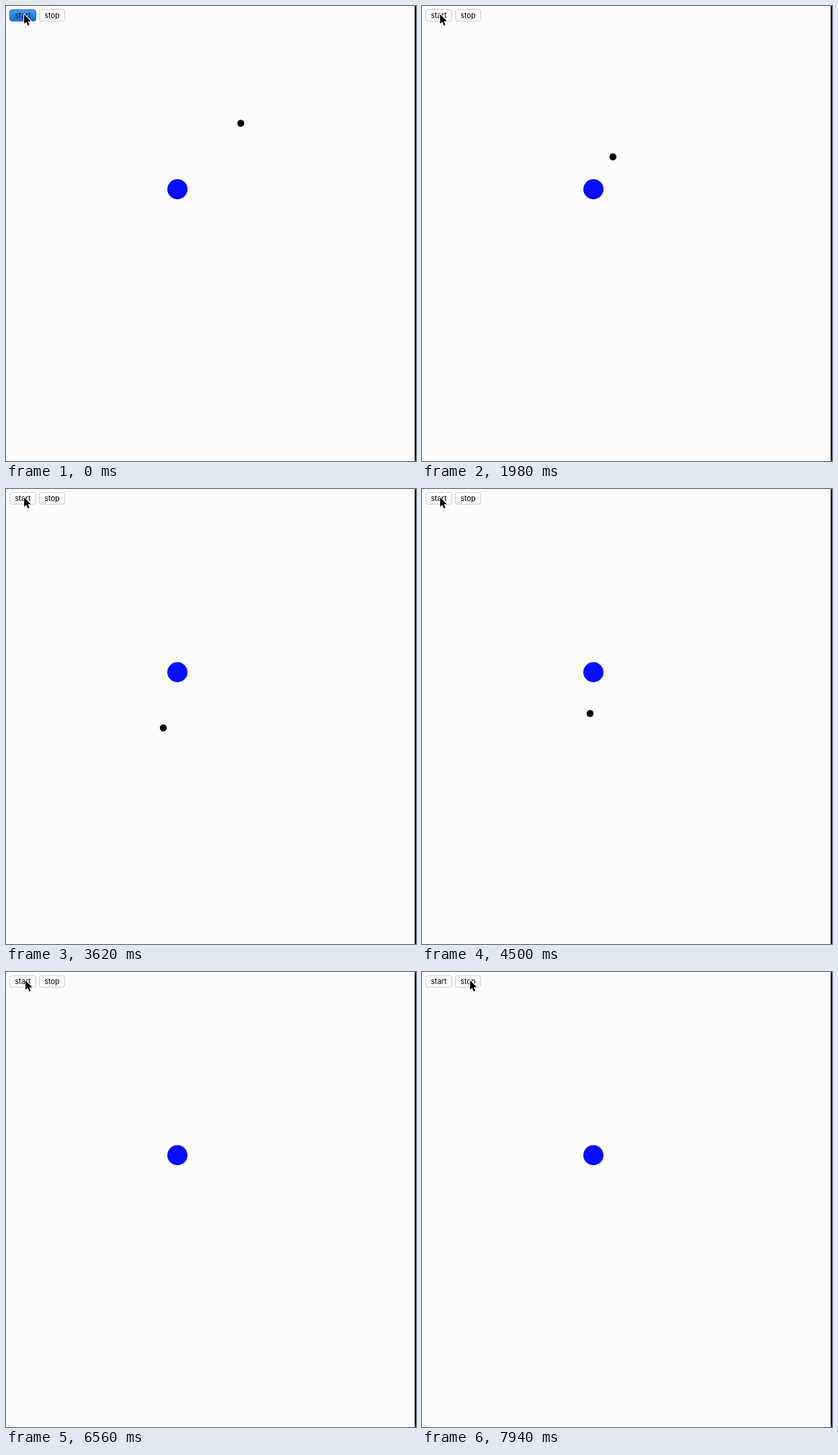
Recreate the animation shown at these times as an HTML page with a canvas. Size 610 by 678 pixels, loop 8000 ms.

```html
<!DOCTYPE html>
<html lang="en">
<head>
<meta charset="utf-8">
<title>Orbit</title>
<style>
  html, body { margin: 0; width: 100%; height: 100%; overflow: hidden; background: #fcfcfe; }
  canvas { display: block; }
</style>
</head>
<body>
<canvas id="stage" width="610" height="678"></canvas>
<script>
const ctx = document.getElementById('stage').getContext('2d');
const LOOP = 8000;
const SUN = { x: 255, y: 273, r: 15 };
const BALL_R = 5.2;
const SKY_TOP = 23;
const GM = 5083;

// Each pass of the ball is a Kepler arc: last step, step and radius of the
// farthest point, its angle in degrees, and the angular momentum.
const ARCS = [
  { end: 20.8, apex: -6.2, R: 142.7, deg: -44.5, L: 80 },
  { end: 40, apex: 30.5, R: 69.5, deg: 123.9, L: 78 },
  { end: 69.3, apex: 54.5, R: 93, deg: -68.5, L: 100 },
  { end: 102.5, apex: 86, R: 102, deg: 100.8, L: 68 },
  { end: Infinity, apex: 239.6, R: 425, deg: -97.5, L: 90 }
];

const CLICKS = [
  { x: 27, y: 13, from: -60, to: 140 },
  { x: 71.5, y: 13, from: 7340, to: 7520 }
];

const clamp = (v, lo, hi) => Math.min(hi, Math.max(lo, v));
const ease = u => u * u * (3 - 2 * u);

// Steps come in threes, shown for 20, 20 and 100 ms.
function stepAt(t) {
  const s = t + 20;
  return 3 * Math.floor(s / 140) + Math.min(2, Math.floor((s % 140) / 20));
}

function ballAt(step) {
  const { apex, R, deg, L } = ARCS.find(arc => step < arc.end);
  const e = 1 - L * L / GM / R;
  const a = R / (1 + e);
  const b = a * Math.sqrt(1 - e * e);
  const mean = clamp((step - apex) * Math.sqrt(GM / a ** 3), -Math.PI, Math.PI);
  let lo = -Math.PI, hi = Math.PI;
  for (let i = 0; i < 40; i++) {
    const mid = (lo + hi) / 2;
    if (mid + e * Math.sin(mid) < mean) lo = mid; else hi = mid;
  }
  const along = a * (e + Math.cos(lo));
  const across = b * Math.sin(lo);
  const q = deg * Math.PI / 180;
  return {
    x: SUN.x + along * Math.cos(q) + across * Math.sin(q),
    y: SUN.y + along * Math.sin(q) - across * Math.cos(q)
  };
}

function pointerAt(t) {
  const nudge = 2 * clamp((t - 6400) / 120, 0, 1);
  const slide = 42.5 * ease(clamp((t - 6640) / 620, 0, 1));
  return { x: 27 + nudge + slide, y: 12.5 };
}

function disc(x, y, r, color) {
  ctx.fillStyle = color;
  ctx.beginPath();
  ctx.arc(x, y, r, 0, 2 * Math.PI);
  ctx.fill();
}

function button(x, w, label, pressed) {
  let fill = '#fff';
  if (pressed) {
    fill = ctx.createLinearGradient(0, 5, 0, 23);
    fill.addColorStop(0, '#4b9df3');
    fill.addColorStop(1, '#1668cf');
  }
  ctx.beginPath();
  ctx.roundRect(x + 0.5, 5.5, w - 1, 17, 3.5);
  ctx.fillStyle = fill;
  ctx.fill();
  ctx.strokeStyle = pressed ? '#2a70c8' : '#cbcbbd';
  ctx.lineWidth = 1;
  ctx.stroke();
  ctx.fillStyle = pressed ? '#06182e' : '#000';
  ctx.font = '11px Inter, sans-serif';
  ctx.textAlign = 'center';
  ctx.fillText(label, x + w / 2, 18);
}

function clickRing({ x, y, from, to }, t) {
  const fadeIn = clamp((t - from - 60) / 60, 0, 1);
  const fadeOut = clamp((to + 120 - t) / 120, 0, 1);
  const alpha = 0.4 * Math.min(fadeIn, fadeOut);
  if (!alpha) return;
  ctx.strokeStyle = `rgba(0, 0, 0, ${alpha})`;
  ctx.lineWidth = 2;
  ctx.beginPath();
  ctx.arc(x, y, 22, 0, 2 * Math.PI);
  ctx.stroke();
}

function pointer({ x, y }) {
  ctx.save();
  ctx.translate(x, y);
  const arrow = new Path2D('M0 0V14L3.2 11L5.5 16.5L7.8 15.5L5.5 10.2H10Z');
  ctx.lineJoin = 'round';
  ctx.lineWidth = 2;
  ctx.strokeStyle = '#fff';
  ctx.stroke(arrow);
  ctx.fillStyle = '#000';
  ctx.fill(arrow);
  ctx.restore();
}

function draw(t) {
  ctx.fillStyle = '#fcfcfe';
  ctx.fillRect(0, 0, 610, 678);
  ctx.fillStyle = '#000';
  ctx.fillRect(608, 0, 2, 678);

  disc(SUN.x, SUN.y, SUN.r, '#000fff');
  ctx.save();
  ctx.beginPath();
  ctx.rect(0, SKY_TOP, 608, 678 - SKY_TOP);
  ctx.clip();
  const ball = ballAt(stepAt(t));
  disc(ball.x, ball.y, BALL_R, '#000');
  ctx.restore();

  const [start, stop] = CLICKS.map(c => t >= c.from && t < c.to);
  button(5, 40, 'start', start);
  button(49, 39, 'stop', stop);
  CLICKS.forEach(c => clickRing(c, t));
  pointer(pointerAt(t));
}

const began = performance.now();
function tick() {
  draw((performance.now() - began) % LOOP);
  requestAnimationFrame(tick);
}
tick();
</script>
</body>
</html>
```
